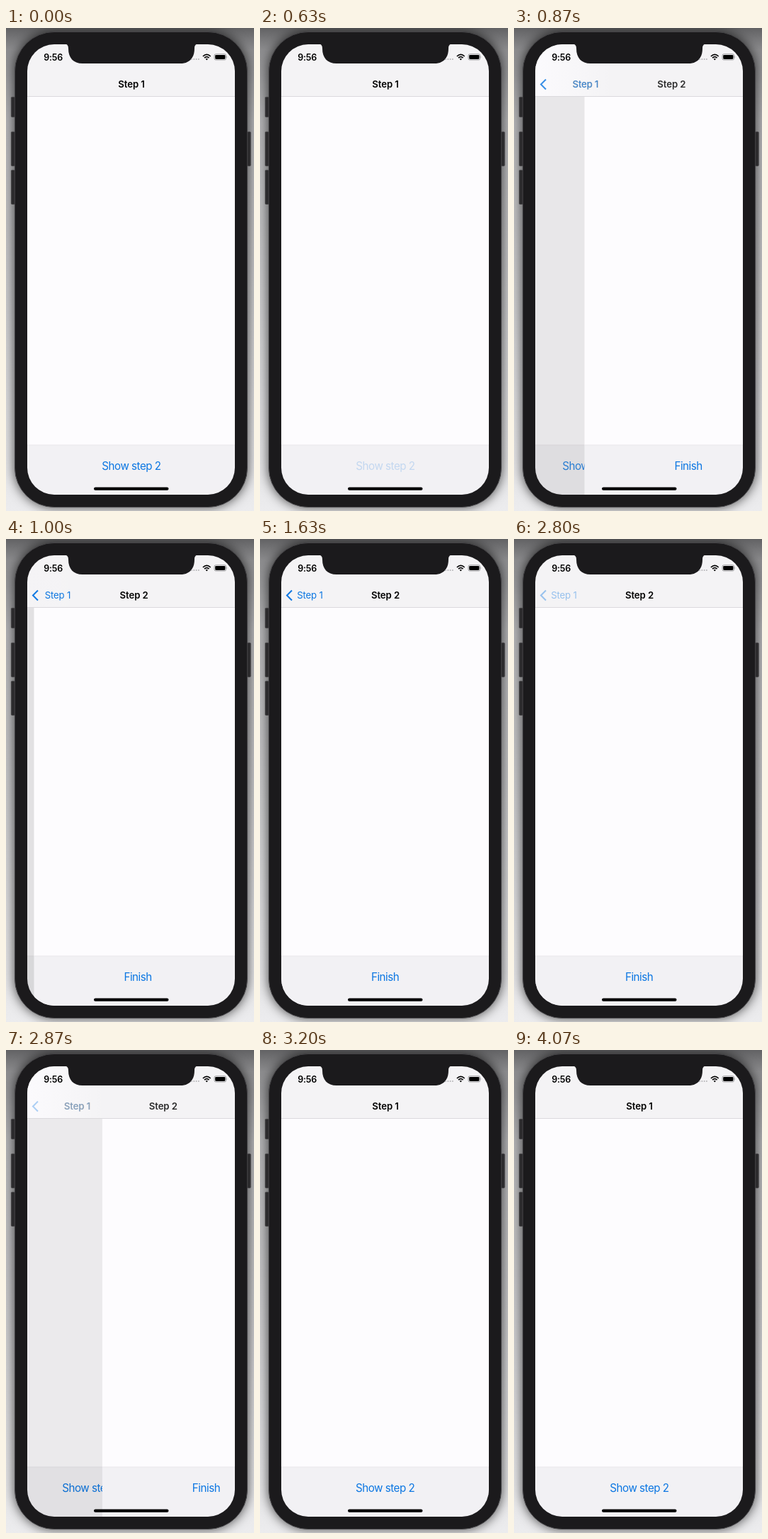
Animation of 350x681 px, one loop 4430 ms. Source, as an HTML page:

```html
<!DOCTYPE html>
<html lang="en">
<head>
<meta charset="utf-8">
<title>Step navigation</title>
<style>
  html, body { margin: 0; width: 100%; height: 100%; overflow: hidden; }
  body {
    position: relative;
    background: linear-gradient(#626264 0, #8c8c8e 30px, #b4b4b6 130px, #c8c8ca 350px, #ececee 681px);
  }
  .phone {
    position: absolute; left: 12px; top: 5px; width: 329px; height: 671px;
    box-sizing: border-box; border: 1px solid #464548; border-radius: 56px;
    background: #1b1a1c; box-shadow: 0 0 16px rgba(0, 0, 0, .7);
  }
  svg { position: absolute; left: 0; top: 0; width: 350px; height: 681px; }
  text { font-family: Inter, Roboto, "Liberation Sans", sans-serif; text-anchor: middle; }
  .title { font-size: 13.2px; font-weight: 600; letter-spacing: -.1px; }
  .back { font-size: 13.2px; letter-spacing: -.2px; fill: #0b76e2; }
  .button { font-size: 15.2px; letter-spacing: -.5px; fill: #0b76e2; }
  .clock { font-size: 12.5px; font-weight: 600; letter-spacing: -.2px; }
</style>
</head>
<body>
<div class="phone"></div>
<svg viewBox="0 0 350 681">
  <defs>
    <clipPath id="screen"><rect x="30" y="23" width="293" height="635" rx="38"/></clipPath>
    <linearGradient id="fade">
      <stop offset="0" stop-color="#fdfcff"/>
      <stop offset="1" stop-color="#fdfcff" stop-opacity="0"/>
    </linearGradient>
    <g id="page">
      <rect x="30" y="97" width="293" height="491" fill="#fdfcfe"/>
      <rect x="30" y="588" width="293" height="70" fill="#f2f1f4"/>
      <rect x="30" y="587.5" width="293" height="1" fill="#e9e8eb"/>
    </g>
  </defs>

  <!-- side buttons -->
  <g fill="#2c2b2d" stroke="#434245" stroke-width=".8">
    <rect x="7.4" y="97.4" width="5" height="28" rx="1"/>
    <rect x="7.4" y="146.4" width="5" height="48" rx="1"/>
    <rect x="7.4" y="200.4" width="5" height="48" rx="1"/>
    <rect x="340.6" y="146.4" width="4.6" height="48" rx="1"/>
  </g>

  <g clip-path="url(#screen)">
    <g id="first">
      <use href="#page"/>
      <text id="show" class="button" x="177" y="623">Show step 2</text>
    </g>
    <rect id="dim" x="30" y="97" width="293" height="561"/>
    <g id="second">
      <use href="#page"/>
      <text class="button" x="176.6" y="623">Finish</text>
    </g>

    <rect x="30" y="23" width="293" height="74" fill="#f4f3f5"/>
    <rect id="glow" x="30" y="23" width="110" height="73" fill="url(#fade)"/>
    <rect x="30" y="96.2" width="293" height=".8" fill="#d5d4d7"/>
    <path id="chevron" d="M45 72.5L38 79.5L45 86.5" fill="none" stroke="#0b76e2" stroke-width="2"/>
    <text id="title1" class="title" y="84">Step 1</text>
    <text id="back" class="back" y="84">Step 1</text>
    <text id="title2" class="title" y="84">Step 2</text>
  </g>

  <path d="M81 22C86 22.5 88 24 88 29C88 42 95 50 108 50H246C259 50 266 42 266 29C266 24 268 22.5 273 22Z" fill="#1b1a1c"/>
  <text class="clock" x="66.6" y="45.5">9:56</text>
  <g fill="#b5b4b7">
    <circle cx="262" cy="44" r="1"/><circle cx="265.3" cy="44" r="1"/>
    <circle cx="268.6" cy="44" r="1"/><circle cx="271.9" cy="44" r="1"/>
  </g>
  <g fill="none" stroke="#000" stroke-width="1.7">
    <path d="M277.9 40Q283.3 34.8 288.7 40"/>
    <path d="M280 42.2Q283.3 39 286.6 42.2"/>
  </g>
  <path d="M281.6 43.6Q283.3 42.2 285 43.6L283.3 45.5Z"/>
  <rect x="294" y="36.7" width="16.6" height="8.4" rx="2.3" fill="none" stroke="#8a898c" stroke-width=".8"/>
  <rect x="295.2" y="37.9" width="14.2" height="6" rx="1.3"/>
  <path d="M311.5 39.5Q313 40.9 311.5 42.3Z" fill="#8a898c"/>
  <rect x="124" y="647.6" width="105.5" height="4.2" rx="2.1"/>
</svg>
<script>
  const LOOP = 4430, PUSH = 727, POP = 2805, BAR = 340;
  const PRESS = 300, BACK_PRESS = 2710;
  const WIDTH = 293;
  const el = id => document.getElementById(id);
  const set = (id, name, value) => el(id).setAttribute(name, value);
  const clamp = v => Math.min(1, Math.max(0, v));

  // critically damped spring for the pages, 0 to 1
  const spring = ms => {
    const x = Math.max(0, ms) * .0192;
    return 1 - (1 + x) * Math.exp(-x);
  };

  // cubic-bezier(.25, .1, .25, 1) for the bar
  const bezier = (a, b, s) => 3 * a * s * (1 - s) ** 2 + 3 * b * s * s * (1 - s) + s ** 3;
  const ease = x => {
    if (x <= 0) return 0;
    if (x >= 1) return 1;
    let lo = 0, hi = 1;
    for (let i = 0; i < 24; i++) {
      const mid = (lo + hi) / 2;
      if (bezier(.25, .25, mid) < x) lo = mid; else hi = mid;
    }
    return bezier(.1, 1, lo);
  };

  function draw(t) {
    const popping = t >= POP;
    const page = popping ? 1 - spring(t - POP) : spring(t - PUSH);
    const bar = popping ? 1 - ease((t - POP) / BAR) : ease((t - PUSH) / BAR);

    set('first', 'transform', `translate(${-.3 * WIDTH * page})`);
    set('second', 'transform', `translate(${WIDTH * (1 - page)})`);
    set('dim', 'opacity', .11 * page);
    set('glow', 'opacity', clamp(4 * bar * (1 - bar)));

    let show = 1;
    if (t >= PRESS && t < PUSH) show = 1 - .8 * clamp((t - PRESS) / 60);
    else if (t >= PUSH && !popping) show = .2 + .8 * ease((t - PUSH) / 280);
    set('show', 'opacity', show);

    const held = t < BACK_PRESS ? 1 : 1 - .6 * clamp((t - BACK_PRESS) / 60);
    const labelX = 177 - 106.5 * bar;
    set('title1', 'x', labelX);
    set('title1', 'opacity', 1 - bar);
    set('back', 'x', labelX);
    set('back', 'opacity', bar * held);
    set('chevron', 'opacity', bar ** .6 * held);
    set('title2', 'x', 177 + 159 * (1 - bar));
    set('title2', 'opacity', bar ** .6);
  }

  const start = performance.now();
  const tick = () => {
    draw((performance.now() - start) % LOOP);
    requestAnimationFrame(tick);
  };
  tick();
</script>
</body>
</html>
```
